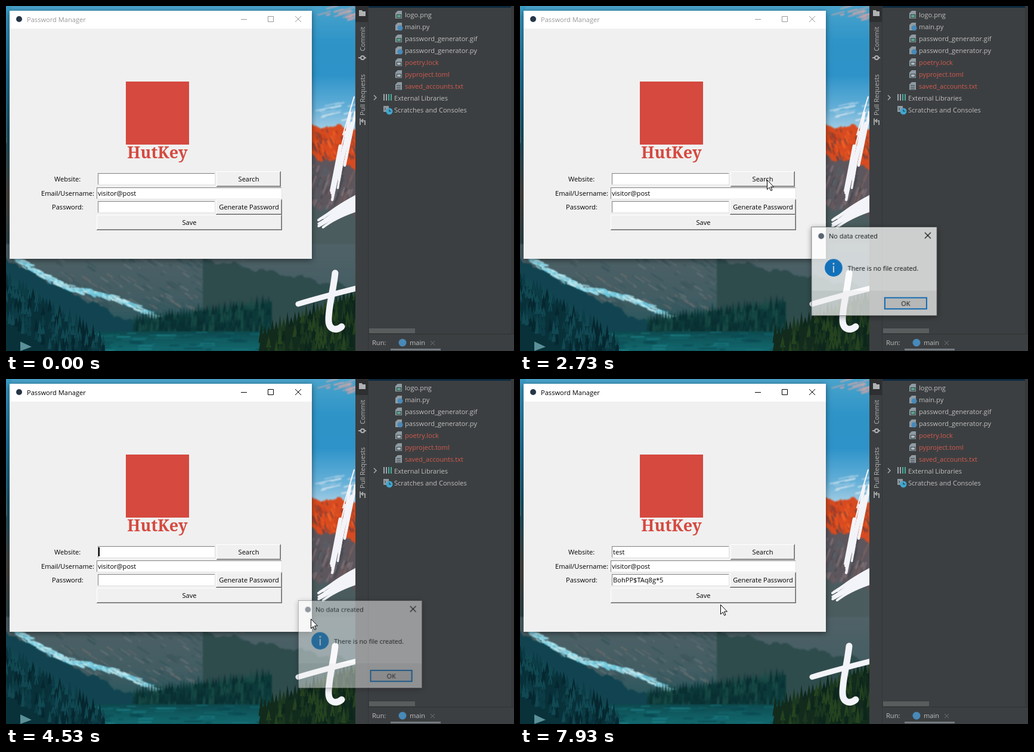
Animation of 852 by 580 pixels, one loop 8000 ms. Source, as an HTML page with a canvas:

```html
<!DOCTYPE html>
<html lang="en">
<head>
<meta charset="utf-8">
<title>Password Manager</title>
<style>
html, body { margin: 0; width: 100%; height: 100%; overflow: hidden; background: #3c3f41; }
canvas { display: block; width: 852px; height: 580px; }
</style>
</head>
<body>
<canvas id="stage" width="852" height="580"></canvas>
<script>
const W = 852, H = 580, LOOP = 8000, STEP = 200 / 3;
const UI = '11.1px "Open Sans", "Noto Sans", sans-serif';
const stage = document.getElementById('stage').getContext('2d');
let c = stage;

const clamp = v => Math.max(0, Math.min(1, v));
const mix = (a, b, u) => a + (b - a) * u;
const bend = (a, m, b, u) => mix(mix(a, m, u), mix(m, b, u), u);
const between = (v, a, b) => v >= a && v < b;

let seed = 71;
const rnd = (a = 0, b = 1) => mix(a, b, (seed = seed * 16807 % 2147483647) / 2147483647);
const pick = list => list[Math.floor(rnd(0, list.length))];

function repeat(n, paint) {
  for (let i = 0; i < n; i++) paint(i / n, i);
}

function rect(x, y, w, h, color) {
  c.fillStyle = color;
  c.fillRect(x, y, w, h);
}

function fill(path, color) {
  c.fillStyle = color;
  c.fill(new Path2D(path));
}

function stroke(path, color, width = 1) {
  c.strokeStyle = color;
  c.lineWidth = width;
  c.stroke(new Path2D(path));
}

function dot(x, y, r, color) {
  c.beginPath();
  c.arc(x, y, r, 0, Math.PI * 2);
  c.fillStyle = color;
  c.fill();
}

function text(s, x, y, color = '#000', align = 'left', font = UI) {
  c.font = font;
  c.textAlign = align;
  c.fillStyle = color;
  c.fillText(s, x, y);
}

function fade(y0, y1, ...colors) {
  const g = c.createLinearGradient(0, y0, 0, y1);
  colors.forEach((col, i) => g.addColorStop(i / (colors.length - 1), col));
  return g;
}

// Rough skyline from (x0,y0) to (x1,y1), filled down to the bottom edge
function ridge(x0, y0, x1, y1, rough, color) {
  let path = `M${x0} ${H}`;
  for (let x = x0; x <= x1 + 3; x += 3) {
    const wave = Math.sin(x * 0.11) + Math.sin(x * 0.29) / 2;
    path += `L${x} ${mix(y0, y1, (x - x0) / (x1 - x0)) + rough * (wave + rnd(-0.5, 0.5))}`;
  }
  fill(`${path}V${H}Z`, color);
}

function streaks(n, x0, y0, x1, y1, dx, dy, colors) {
  repeat(n, () => {
    const k = rnd(0.3, 1.4);
    stroke(`M${rnd(x0, x1)} ${rnd(y0, y1)}l${dx * k} ${dy * k}`, pick(colors), rnd(1, 3));
  });
}

function forest(x0, y0, x1, y1, size, colors) {
  ridge(x0, y0, x1, y1, 3, colors[0]);
  repeat(5, (_, row) => {
    for (let x = x0; x < x1; x += size * 0.35) {
      const y = mix(y0, y1, (x - x0) / (x1 - x0)) + row * size;
      const h = size * rnd(0.6, 1.3), w = size * 0.25;
      fill(`M${x} ${y - h}l${w} ${h * 1.5}h${-2 * w}Z`, pick(colors));
    }
  });
}

function landscape() {
  rect(0, 0, 586, 230, fade(0, 230, '#4aa3cb', '#2f95c8', '#2d93c9', '#65b0d8', '#c9dfec'));
  streaks(14, 515, 0, 580, 24, 22, -6, ['#d9aba8', '#c9a3a8', '#b4abb9']);
  streaks(14, 510, 165, 580, 195, 22, -5, ['#c9dfec', '#a9cfe5']);
  rect(0, 0, 9, 425, fade(0, 425, '#3a9cc4', '#21749b', '#1b5365', '#4a4540', '#24464e'));

  ridge(505, 200, 590, 206, 3, '#d84b20');
  streaks(90, 510, 206, 586, 258, 4, 10, ['#f26529', '#a93a22', '#6d4342', '#eb5620']);
  ridge(505, 250, 590, 272, 5, '#5d565d');
  streaks(90, 510, 265, 586, 340, -6, 16, ['#85787d', '#48484f', '#56646b', '#75605f']);
  ridge(505, 335, 590, 352, 4, '#4b5c5f');

  rect(0, 400, 586, 180, fade(400, 580, '#506267', '#425d63', '#0f5158'));
  streaks(160, 80, 420, 400, 505, 14, 9, ['#5f6f73', '#3c565c', '#68696a', '#34535a']);
  ridge(330, 425, 590, 475, 3, '#2f4c4d');
  ridge(-4, 422, 215, 535, 4, '#114450');
}

function glacier() {
  repeat(130, u => {
    const x = mix(14, 255, u), y = bend(424, 478, 532, u) + 9 * Math.sin(u * 6);
    stroke(`M${x} ${y + rnd(-4, 4)}l${rnd(6, 16)} ${rnd(2, 7)}`, pick(['#6cc6dc', '#9bdbe8', '#b9e8f0']), rnd(2, 4));
  });
}

function brushwork() {
  const white = '#f3f4f9';
  c.lineCap = c.lineJoin = 'round';
  repeat(13, u => {
    const x = mix(586, 558, u), y = mix(142, 225, u) + rnd(0, 45);
    stroke(`M${x} ${y}l${rnd(-22, -14)} ${rnd(62, 92)}`, white, rnd(2, 5));
  });
  repeat(9, u => stroke(`M${524 + rnd(-2, 10)} ${mix(356, 374, u)}Q552 ${mix(338, 358, u)} 590 ${mix(318, 346, u)}`, white, 4));
  stroke('M552 449C549 478 541 506 541 527C541 546 555 546 563 539', white, 11);
  stroke('M490 501Q530 489 590 474', white, 9);
}

function wallpaper() {
  c.save();
  c.beginPath();
  c.rect(0, 0, 586, H);
  c.clip();
  c.filter = 'blur(1px)';
  landscape();
  glacier();
  forest(215, 530, 445, 500, 14, ['#0d3a3a', '#0a2f32', '#184a45']);
  rect(110, 547, 330, 33, fade(547, 580, '#0d4a4f', '#126a70'));
  streaks(60, 140, 548, 420, 580, 24, 0, ['#1a7a80', '#0b4a52', '#126268']);
  c.filter = 'none';
  forest(-5, 455, 165, 566, 16, ['#08313a', '#0c3c45', '#06272f', '#114852']);
  forest(428, 555, 590, 487, 18, ['#122b1d', '#1b371f', '#0d261c', '#25431f']);
  fill('M24 564l19 9l-19 7Z', '#5b9099');
  brushwork();
  c.restore();
}

function fileIcon(y, badge, round) {
  fill(`M657 ${y - 7}h7v13h-11v-9Z`, '#8f9ba3');
  if (round) dot(661, y + 2, 4.5, badge);
  else if (badge) {
    rect(655, y - 1, 8, 6, '#35464c');
    rect(656, y, 6, 4, badge);
  } else repeat(3, (_, i) => rect(655, y - 2 + i * 3, 7, 1, '#3c3f41'));
}

function sideLabel(s, y) {
  c.save();
  c.translate(602, y);
  c.rotate(-Math.PI / 2);
  text(s, 0, 0, '#b4b6b7');
  c.restore();
}

function ide() {
  const ink = '#bfbfbf', red = '#d25a4f', icon = '#afb1b3', blue = '#4889b8';
  rect(586, 0, 266, H, '#3c3f41');
  rect(586, 0, 22, 27, '#2d2f30');
  rect(607, 0, 1, H, '#323537');
  rect(608, 0, 239, 3, '#0d293e');
  rect(847, 0, 5, 551, '#37393b');
  rect(609, 542, 77, 8, '#5a5d5e');
  rect(608, 551, 244, 1, '#2f3233');
  fill('M592 7h5l1 2h5v8h-11Z', icon);
  sideLabel('Commit', 76);
  sideLabel('Pull Requests', 184);
  stroke('M591 87h4M601 87h3M601 87a3 3 0 1 0 -6 0a3 3 0 1 0 6 0', icon, 2);
  stroke('M594 189v11M602 200v-7h-5M599 190l-3 3l3 3', icon, 1.7);

  const names = ['logo.png', 'main.py', 'password_generator.gif', 'password_generator.py',
    'poetry.lock', 'pyproject.toml', 'saved_accounts.txt'];
  const badges = { png: '#59a588', gif: '#59a588', py: blue, lock: '#aeb5ba', toml: '#aeb5ba' };
  names.forEach((name, i) => {
    const type = name.split('.')[1];
    fileIcon(15 + i * 20, badges[type], type === 'py');
    text(name, 669, 19 + i * 20, i < 4 ? ink : red);
  });
  stroke('M617 150l4 4l-4 4', icon, 1.4);
  repeat(4, (_, i) => rect(633 + i * 4, 148, 2, 11, i < 2 ? '#9aa7b0' : '#4cab9b'));
  text('External Libraries', 651, 159, ink);
  rect(633, 168, 9, 10, '#8f9ba3');
  stroke('M635 171l2 2l-2 2', '#3c3f41');
  dot(643, 177, 5.5, '#40a7d0');
  stroke('M643 174v3h3', '#263b47', 1.2);
  text('Scratches and Consoles', 651, 179, ink);
  text('Run:', 614, 570, ink);
  rect(645, 576, 84, 3, '#747a80');
  dot(665, 566, 6.5, blue);
  text('main', 677, 570, ink);
  stroke('M712 563l7 7M719 563l-7 7', '#74777a');
}

function shadowBox(x, y, w, h, color) {
  c.save();
  c.shadowColor = 'rgba(0,0,0,.5)';
  c.shadowBlur = 9;
  c.shadowOffsetY = 2;
  rect(x, y, w, h, color);
  c.restore();
}

function entry(x, y, w) {
  rect(x, y, w, 20, '#e3e3e3');
  rect(x, y, w - 1, 19, '#808080');
  rect(x + 1, y + 1, w - 2, 18, '#fff');
}

function button(label, x, y, w, pressed) {
  const d = pressed ? 1 : 0, edges = pressed ? ['#fff', '#696969'] : ['#696969', '#fff'];
  rect(x, y, w, 26, edges[0]);
  rect(x, y, w - 1, 25, edges[1]);
  rect(x + 1, y + 1, w - 2, 24, pressed ? '#f0f0f0' : '#a0a0a0');
  rect(x + 1, y + 1, w - 3, 23, '#f0f0f0');
  text(label, x + w / 2 + d, y + 17 + d, '#000', 'center');
}

function scene() {
  wallpaper();
  ide();
  shadowBox(6, 8, 507, 417, '#f0f0f0');
  rect(6, 8, 507, 30, '#fff');
  dot(22, 22, 5, '#263647');
  rect(201, 127, 106, 106, '#d5493f');
  text('HutKey', 254, 256, '#d5493f', 'center', 'bold 27px "Noto Serif", serif');
  text('Website:', 81, 295);
  text('Email/Username:', 59, 319);
  text('Password:', 77, 342);
  entry(154, 281, 197);
  entry(152, 305, 311);
  entry(154, 328, 197);
  text('visitor@post', 154, 319);
  button('Save', 152, 351, 311);
}

function typed(t) {
  if (t < 5930) return '';
  if (t < 6070) return 't';
  if (t < 6400) return 'te';
  return t < 6670 ? 'tes' : 'test';
}

// The caret blinks 600 ms on, 300 ms off from the moment the field gets focus
function caretOn(t) {
  const focus = t < 4470 ? 1670 : 4470;
  return t >= focus && !between(t, 2470, 4470) && (t - focus) % 900 < 600;
}

function appWindow(t) {
  const active = between(t, 1670, 2470) || t >= 4470;
  const ink = active ? '#000' : '#999';
  text('Password Manager', 35, 27, ink);
  stroke('M394 22.5h10M439.5 17.5h9v9h-9zM485 17l10 10M495 17l-10 10', ink);
  text(typed(t), 156, 295);
  if (caretOn(t)) rect(Math.round(155 + c.measureText(typed(t)).width), 283, 2, 15, '#000');
  if (t >= 7270) text('BohPP$TAq8g*5', 156, 342);
  button('Search', 353, 278, 108, between(t, 2470, 2600));
  button('Generate Password', 352, 325, 111, between(t, 7200, 7330));
}

function dialogArt() {
  shadowBox(487, 370, 214, 152, '#5b5e60');
  rect(488, 371, 212, 150, '#fff');
  rect(488, 479, 212, 42, '#f0f0f0');
  dot(504, 386, 5, '#263647');
  text('No data created', 517, 390);
  stroke('M680 380l10 10M690 380l-10 10', '#000', 1.2);
  dot(525, 440, 15, '#0078d7');
  dot(525, 433, 1.6, '#fff');
  rect(524, 437, 2, 11, '#fff');
  text('There is no file created.', 549, 445);
  rect(611, 490, 73, 21, '#0078d7');
  rect(613, 492, 69, 17, '#e1e1e1');
  text('OK', 647.5, 505, '#000', 'center');
}

function dialog(t) {
  const shown = clamp(Math.min(t - 2570, 4650 - t) / 230);
  if (!shown) return;
  const s = mix(0.95, 1, shown);
  c.save();
  c.globalAlpha = shown;
  c.translate(594, 446);
  c.scale(s, s);
  c.drawImage(popup, -594, -446);
  c.restore();
}

// Each move: time span, end point and, for curved moves, a control point
const origin = { x: 340, y: 575 };
const moves = [
  { from: 1060, to: 1600, x: 370, y: 238 },
  { from: 1800, to: 2130, x: 414, y: 292 },
  { from: 3270, to: 3790, x: 633, y: 492, cx: 560, cy: 690 },
  { from: 4400, to: 5130, x: 274, y: 294, cx: 461, cy: 350 },
  { from: 6620, to: 7070, x: 416, y: 345 },
  { from: 7460, to: 7930, x: 336, y: 379 }
];

function pointerAt(t) {
  let p = origin;
  for (const m of moves) {
    if (t < m.from) break;
    const u = clamp((t - m.from) / (m.to - m.from)), e = u * (2 - u);
    const { cx = (p.x + m.x) / 2, cy = (p.y + m.y) / 2 } = m;
    p = { x: bend(p.x, cx, m.x, e), y: bend(p.y, cy, m.y, e) };
  }
  return p;
}

function pointer(t) {
  if (t < moves[0].from) return;
  const p = pointerAt(t), x = Math.round(p.x), y = Math.round(p.y);
  const inside = (left, top, w) => between(x, left, left + w) && between(y, top, top + 20);
  c.save();
  c.translate(x, y);
  if (inside(154, 281, 197) || inside(152, 305, 311) || inside(154, 328, 197)) {
    stroke('M-3 -7.5h3M1 -7.5h3M.5 -7v14M-3 7.5h3M1 7.5h3', '#000');
  } else {
    const arrow = 'M.5 .5V16.5L4.2 13L6.7 18.5L9 17.5L6.5 12H11.5Z';
    fill(arrow, '#fff');
    stroke(arrow, '#000');
  }
  c.restore();
}

function layer(paint) {
  const el = document.createElement('canvas');
  el.width = W;
  el.height = H;
  c = el.getContext('2d');
  paint();
  c = stage;
  return el;
}

const backdrop = layer(scene), popup = layer(dialogArt);
const start = performance.now();

function draw() {
  const now = (performance.now() - start) % LOOP;
  // The screen is refreshed fifteen times a second
  const t = Math.floor((now + 5) / STEP) * STEP + 8;
  c.drawImage(backdrop, 0, 0);
  appWindow(t);
  dialog(t);
  pointer(t);
  requestAnimationFrame(draw);
}
draw();
</script>
</body>
</html>
```
